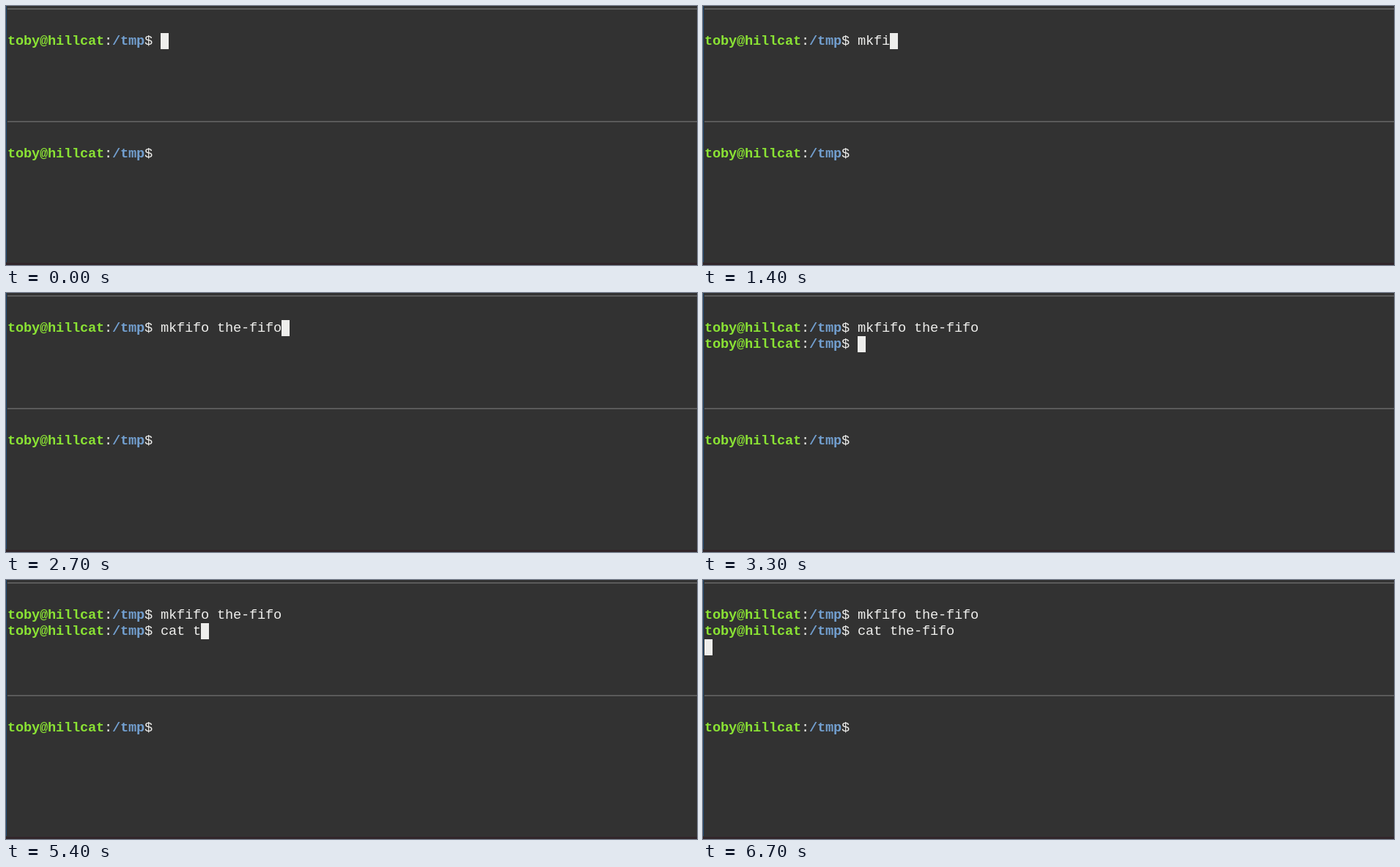
An HTML page with a canvas that plays this animation: 943 px wide and 354 px high, repeating every 8000 ms.

```html
<!DOCTYPE html>
<html lang="en">
<head>
<meta charset="utf-8">
<title>Named pipe in a split terminal</title>
<style>
  html, body { margin: 0; width: 100%; height: 100%; overflow: hidden; background: #323232; }
  canvas { display: block; }
</style>
</head>
<body>
<canvas id="screen" width="943" height="354"></canvas>
<script>
const ctx = document.getElementById('screen').getContext('2d');
const LOOP = 8000, CELL_W = 11, CELL_H = 22, LEFT = 2, ASCENT = 16;
const TOP_PANE = 37, BOTTOM_PANE = 191;
const FONT = '18.667px "Liberation Mono", monospace';
const FG = '#eeeeec', GREEN = '#8ae234', BLUE = '#729fcf';

// Each command: the moment its prompt appears and when each keystroke shows.
const commands = [
  { text: 'mkfifo the-fifo', start: 0, enter: 3300,
    keys: [500, 800, 1100, 1400, 1500, 1600, 1800, 1900, 2000, 2100, 2200, 2400, 2500, 2700, 2700] },
  { text: 'cat the-fifo', start: 3300, enter: 6700,
    keys: [4400, 4600, 4700, 5000, 5400, 5500, 5600, 5700, 5900, 6100, 6200, 6300] }
];

function rect(color, x, y, w, h) {
  ctx.fillStyle = color;
  ctx.fillRect(x, y, w, h);
}

// Writes on the character grid and returns the next column.
function write(text, col, y, color = FG, bold = false) {
  ctx.font = (bold ? 'bold ' : '') + FONT;
  ctx.fillStyle = color;
  for (const ch of text) ctx.fillText(ch, LEFT + CELL_W * col++, y + ASCENT);
  return col;
}

function prompt(y) {
  let col = write('toby@hillcat', 0, y, GREEN, true);
  col = write(':', col, y);
  col = write('/tmp', col, y, BLUE, true);
  return write('$ ', col, y);
}

function cursor(col, y) {
  rect(FG, LEFT + CELL_W * col, y, CELL_W, CELL_H);
}

function draw(t) {
  rect('#323232', 0, 0, 943, 354);
  rect('#204a73', 0, 0, 1, 350);
  rect('#31262a', 0, 351, 943, 3);
  for (const y of [3, 157]) rect('#5a5a5a', LEFT, y, 941, 2);
  prompt(BOTTOM_PANE);

  let y = TOP_PANE, cursorCol = 0;
  for (const { text, start, enter, keys } of commands) {
    if (t < start) break;
    const typed = keys.filter(k => k <= t).length;
    cursorCol = write(text.slice(0, typed), prompt(y), y);
    if (t < enter) break;
    y += CELL_H;
    cursorCol = 0;
  }
  cursor(cursorCol, y);
}

function tick() {
  draw(performance.now() % LOOP);
  requestAnimationFrame(tick);
}
tick();
</script>
</body>
</html>
```
